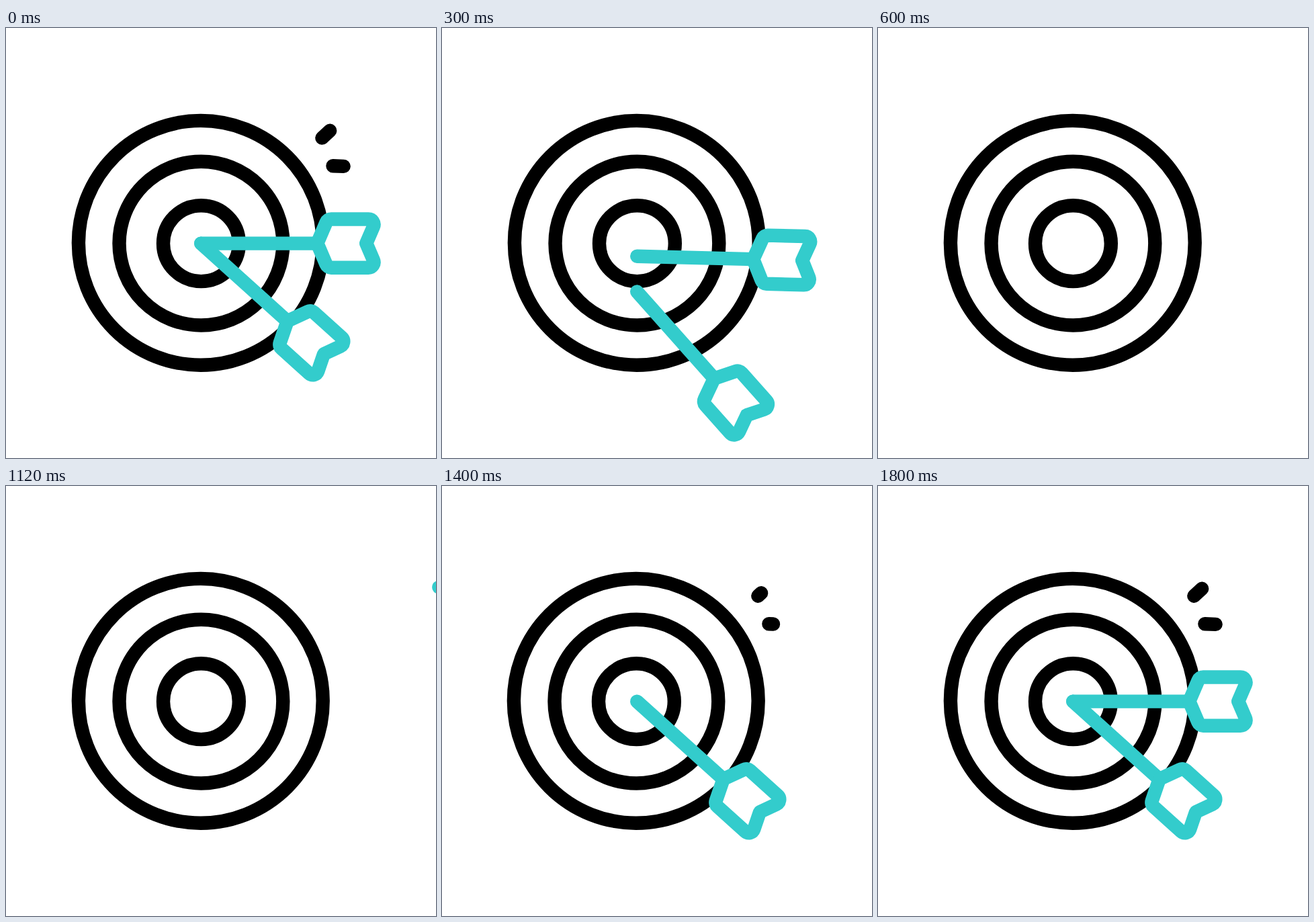
An HTML page for the animation above (1.82 s loop, 640 by 640 pixels).

```html
<!DOCTYPE html>
<html lang="en">
<head>
<meta charset="utf-8">
<title>Bullseye and arrows</title>
<style>
  html, body { margin: 0; width: 100%; height: 100%; overflow: hidden; background: #fff; }
  svg { display: block; width: 100%; height: 100%; }
  g, path, circle { stroke-width: 20.4; stroke-linecap: round; stroke-linejoin: round; }
  #rings, #sparks { fill: none; stroke: #000; }
  .arrow { fill: #fff; stroke: #33cccc; }
</style>
</head>
<body>
<svg viewBox="0 0 640 640">
  <defs>
    <g id="shape">
      <path d="M0 0H173"/>
      <path d="M173 0L186.3 -31.2A8 8 0 0 1 193.7 -36.1H249.3A8 8 0 0 1 256.7 -25L246 0L256.7 25A8 8 0 0 1 249.3 36.1H193.7A8 8 0 0 1 186.3 31.2Z"/>
    </g>
  </defs>
  <g id="rings">
    <circle cx="289.8" cy="319.8" r="181.9"/>
    <circle cx="290.4" cy="320.6" r="121.9"/>
    <circle cx="290.4" cy="320.7" r="56.4"/>
  </g>
  <g id="sparks"><path/><path/></g>
  <use id="low" class="arrow" href="#shape"/>
  <use id="level" class="arrow" href="#shape"/>
</svg>
<script>
const LOOP = 1820;
const HIT = { x: 290.2, y: 320.6 };
const FLIGHT = { time: 250, reach: 365, slope: -0.48, power: 1.42 };
const SPARKS = [
  [470.3, 163.7, 482.2, 152.8],
  [486.4, 205.3, 502.6, 205.9]
];
// Each arrow drops out of the rings, then a new one flies in.
const ARROWS = [
  { id: 'low', angle: 42, drop: t => 147.5 * (t / 400) ** 2.53, dropTurn: 0.0885, gone: 600, launch: 1100, turn: 0.1765 },
  { id: 'level', angle: 0, drop: t => 60 * (Math.max(0, t - 45) / 355) ** 3.5, dropTurn: 0.0775, gone: 600, launch: 1470, turn: 0.0957 }
];
const SHAKES = [1250, 1620];

const $ = id => document.getElementById(id);
const progress = (t, from, to) => Math.min(1, Math.max(0, (t - from) / (to - from)));
const smooth = u => u * u * (3 - 2 * u);
const mix = (a, b, u) => a + (b - a) * u;

function drawArrow(a, t) {
  const el = $(a.id);
  const hidden = t >= a.gone && t < a.launch;
  el.style.display = hidden ? 'none' : '';
  if (hidden) return;
  let { x, y } = HIT, angle = a.angle;
  if (t < a.gone) {
    const d = a.drop(t);
    y += d;
    angle += d * a.dropTurn;
  } else {
    const u = progress(t, a.launch, a.launch + FLIGHT.time);
    const d = FLIGHT.reach * (1 - u ** FLIGHT.power);
    x += d;
    y += d * FLIGHT.slope;
    angle -= d * a.turn;
  }
  el.setAttribute('transform', `translate(${x} ${y}) rotate(${angle})`);
}

function drawSparks(t) {
  const leaving = t < 700;
  const start = leaving ? progress(t, 0, 216) : 0;
  const end = leaving ? 1 : progress(t, 1340, 1490);
  const alpha = leaving ? 1 - progress(t, 120, 180) : progress(t, 1340, 1400);
  const group = $('sparks');
  group.setAttribute('opacity', alpha);
  SPARKS.forEach(([x1, y1, x2, y2], i) => {
    const point = u => `${mix(x1, x2, u)} ${mix(y1, y2, u)}`;
    group.children[i].setAttribute('d', `M${point(start)}L${point(end)}`);
  });
}

function draw(t) {
  const shift = SHAKES.reduce((sum, s) =>
    sum - 6.4 * (smooth(progress(t, s, s + 80)) - smooth(progress(t, s + 80, s + 175))), 0);
  $('rings').setAttribute('transform', `translate(${shift} 0)`);
  drawSparks(t);
  ARROWS.forEach(a => drawArrow(a, t));
}

const began = performance.now();
function tick() {
  draw((performance.now() - began) % LOOP);
  requestAnimationFrame(tick);
}
draw(0);
requestAnimationFrame(tick);
</script>
</body>
</html>
```
